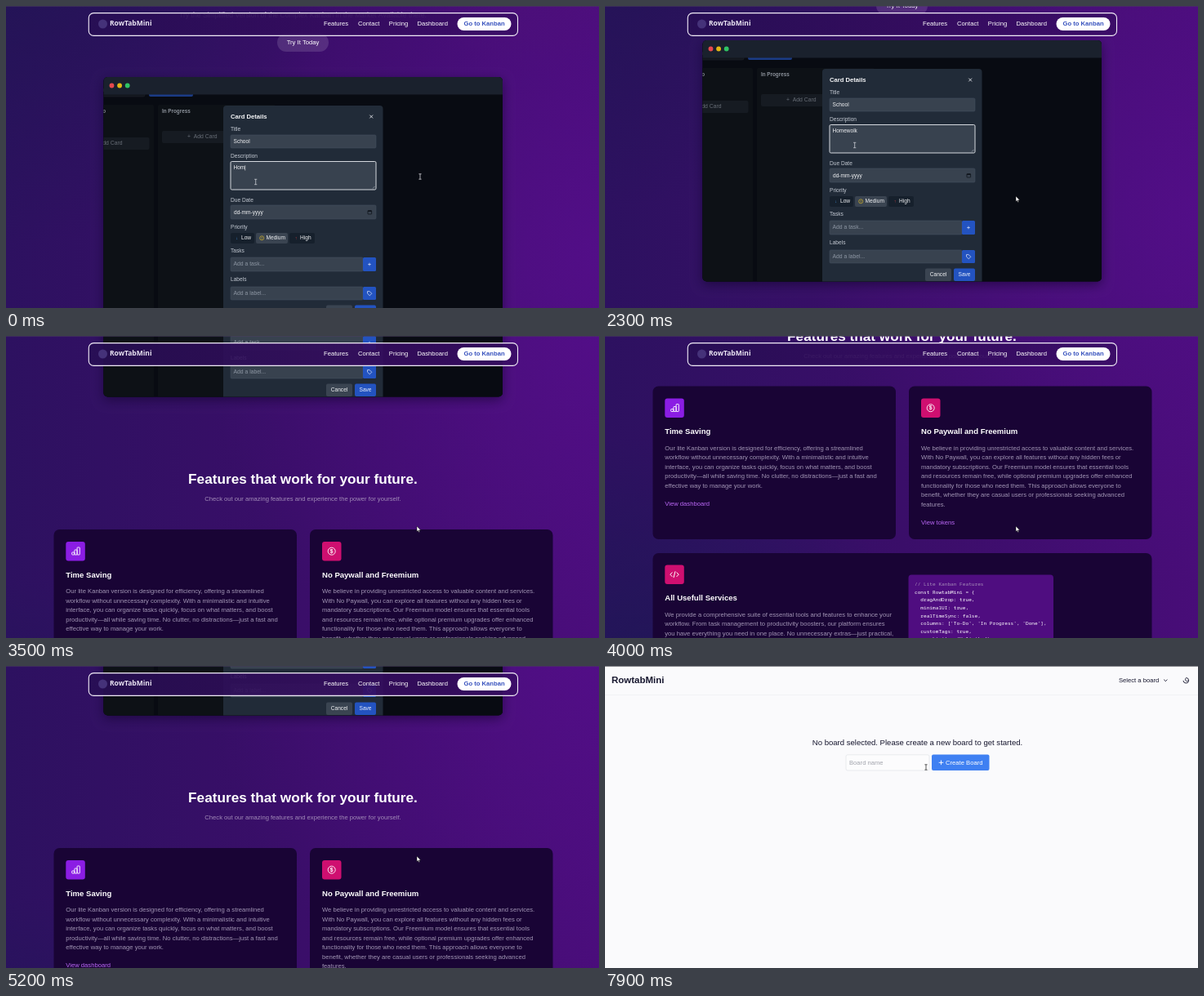
An HTML page with a canvas that plays this animation: 726 px wide and 370 px high, repeating every 8 s.

```html
<!DOCTYPE html>
<html lang="en">
<head>
<meta charset="utf-8">
<title>Board landing page</title>
<style>
html, body { margin: 0; width: 100%; height: 100%; overflow: hidden; background: #2a1460; }
canvas { display: block; width: 726px; height: 370px; }
</style>
</head>
<body>
<canvas id="stage"></canvas>
<script>
const W = 726, H = 370, LOOP = 8000, STEP = 100;
const REM = 7.65, SMALL = 6.69, MID = 363.5;
const SANS = '"Liberation Sans", Arial, sans-serif';
const MONO = '"Noto Sans Mono", monospace';
const canvas = document.getElementById('stage');
const c = canvas.getContext('2d');
const dpr = window.devicePixelRatio || 1;
canvas.width = W * dpr;
canvas.height = H * dpr;

// Keys are [time, value, ...]; values are interpolated linearly.
function track(keys, t) {
  if (t <= keys[0][0]) return keys[0].slice(1);
  for (let i = 1; i < keys.length; i++) {
    const [a, ...from] = keys[i - 1], [b, ...to] = keys[i];
    if (t <= b) return from.map((v, k) => v + (to[k] - v) * (t - a) / (b - a));
  }
  return keys[keys.length - 1].slice(1);
}

const SCROLL = [[0, 196], [400, 218], [900, 232], [1600, 241], [2400, 241],
  [3500, 504], [4500, 855], [4600, 855], [5200, 518], [6000, 0]];
const POINTER = [[1700, 507, 209], [2300, 503, 233], [6100, 503, 233], [6300, 508, 148],
  [6900, 596, 21], [7700, 596, 21], [7800, 480, 78], [7900, 393, 124]];
const ZOOM = [[5900, 1], [6300, 0.898], [7000, 0.86]];

function box(x, y, x2, y2, fill, r = 0, stroke, lw = 1) {
  c.beginPath();
  c.roundRect(x, y, x2 - x, y2 - y, r);
  if (fill) { c.fillStyle = fill; c.fill(); }
  if (stroke) { c.strokeStyle = stroke; c.lineWidth = lw; c.stroke(); }
}

function text(s, x, y, size, color, { weight = 400, align = 'left', family = SANS, spacing = 0 } = {}) {
  c.font = `${weight} ${size}px ${family}`;
  c.letterSpacing = spacing + 'px';
  c.textAlign = align;
  c.textBaseline = 'middle';
  c.fillStyle = color;
  c.fillText(s, x, y);
}

const BOLD = { weight: 700 };
const CENTER = { align: 'center' };
const BOLD_CENTER = { weight: 700, align: 'center' };

function lines(list, x, y, gap, size, color, opts) {
  list.forEach((s, i) => text(s, x, y + i * gap, size, color, opts));
}

function path(points, color, lw = 1, close = false) {
  c.beginPath();
  points.forEach(([x, y]) => c.lineTo(x, y));
  if (close) c.closePath();
  c.strokeStyle = color;
  c.lineWidth = lw;
  c.stroke();
}

function disc(x, y, r, fill) {
  c.beginPath();
  c.arc(x, y, r, 0, 7);
  c.fillStyle = fill;
  c.fill();
}

function ring(x, y, r, color, lw = 0.8) {
  c.beginPath();
  c.arc(x, y, r, 0, 7);
  c.strokeStyle = color;
  c.lineWidth = lw;
  c.stroke();
}

function plus(x, y, r, color, lw = 0.8) {
  path([[x - r, y], [x + r, y]], color, lw);
  path([[x, y - r], [x, y + r]], color, lw);
}

function glow(x, y, r, rgb, alpha) {
  const g = c.createRadialGradient(x, y, 0, x, y, r);
  g.addColorStop(0, `rgba(${rgb},${alpha})`);
  g.addColorStop(1, `rgba(${rgb},0)`);
  c.fillStyle = g;
  c.fillRect(0, 0, W, H);
}

function backdrop(s) {
  const g = c.createLinearGradient(0, 0, W, 0);
  g.addColorStop(0, '#2d1160');
  g.addColorStop(0.5, '#3a0e69');
  g.addColorStop(1, '#480d78');
  c.fillStyle = g;
  c.fillRect(0, 0, W, H);
  glow(W, 500 - s, 480, '92,15,150', 0.5);
  glow(0, 60 - s, 430, '28,22,78', 0.75);
  glow(640, 90 - s, 190, '88,20,120', 0.4);
  glow(60, 1130 - s, 330, '28,24,84', 0.85);
  glow(120, 1225 - s, 130, '68,18,116', 0.5);
}

function hero() {
  box(284, 95.5, 444, 112.5, 'rgba(255,255,255,.11)', 8.5);
  text('Lite Version of The Rapid Sorter.', 295, 104, SMALL, '#fff');
  text('Learn more', 398, 104, SMALL, '#fff');
  path([[398, 107.5], [432.5, 107.5]], '#fff', 0.5);
  const tight = { weight: 700, align: 'center', spacing: -0.72 };
  text('Modern analytics', MID, 150, 28.7, '#fff', tight);
  text('for the modern world', MID, 178.7, 28.7, '#9f98b4', tight);
  text('Try the Simplified Version of the Complex Kanban in the Market Available there.',
    MID, 207.5, 8.6, '#a79bbb', CENTER);
  box(332, 229.5, 395, 252, 'rgba(255,255,255,.13)', 11.2);
  text('Try It Today', MID, 241, REM, '#fff', CENTER);
}

function beam(x, y, color) {
  path([[x, y - 3.2], [x, y + 3.2]], color, 0.8);
  for (const dy of [-3.2, 3.2]) path([[x - 1.6, y + dy], [x + 1.6, y + dy]], color, 0.8);
}

function field(y, y2, right = 453, stroke) {
  box(275, y, right, y2, '#38424f', 1.5, stroke || '#465160', stroke ? 1 : 0.5);
}

function board(t) {
  box(0, 0, W, 330, '#080b12');
  box(60, 34, 181, 330, '#0d1116', 2);
  box(186, 34, 330, 330, '#0d1116', 2);
  box(60, 7, 170, 24, '#12161d', 2, '#20262f', 0.5);
  text('New column...', 150, 16, 6.4, '#4d535d', { align: 'right' });
  box(175, 7, 229, 24, '#1a3b85', 2);
  text('+  Add Column', 202, 16, 6.8, '#8b9cc4', CENTER);
  text('To Do', 122, 42.5, 6.3, '#858b95', { weight: 700, align: 'right' });
  text('In Progress', 191, 42, 6.3, '#8d939c', BOLD);
  if (t > 5800) text('New Card', 137, 60, 6.4, '#8a9099', { align: 'right' });
  else {
    box(60, 74, 175.5, 89, '#161b22', 2);
    text('+  Add Card', 142.5, 81.5, 6.8, '#676d76', { align: 'right' });
  }
  box(191, 66, 320, 81, '#161b22', 2);
  text('+  Add Card', 258.5, 73.5, 6.8, '#676d76', { align: 'right' });
}

function cardForm(t) {
  const label = '#c3c9d2', muted = '#8c95a2', blue = '#2353c0';
  box(266, 35, 461.5, 340, '#212b38', 4);
  text('Card Details', 275, 48.5, 7.65, '#f4f5f7', BOLD);
  path([[445.3, 46.6], [449.1, 50.4]], '#e5e7eb', 0.9);
  path([[449.1, 46.6], [445.3, 50.4]], '#e5e7eb', 0.9);
  text('Title', 275, 64.5, 6.6, label);
  field(71, 87);
  text('School', 278.5, 79, 6.6, '#f0f1f3');

  text('Description', 275, 97, 6.6, label);
  field(103.5, 138, 453, '#d5d9de');
  const typed = 'Homewolk'.slice(0, 3 + Math.floor(t / 460));
  text(typed, 278.5, 111.5, 6.5, '#f0f1f3');
  if (t < 2300) {
    const x = 279 + c.measureText(typed).width;
    path([[x, 108.3], [x, 114.5]], '#fff', 0.6);
  }
  path([[449, 136.5], [451.5, 134]], '#d5d9de', 0.5);
  beam(305.7, 128.5, '#c8ccd2');

  text('Due Date', 275, 151, 6.6, label);
  field(157, 174);
  text('dd-mm-yyyy', 279, 165.7, 6.6, '#f0f1f3');
  box(443, 163.5, 447.6, 168, null, 0.5, '#10151c', 0.8);
  path([[443, 164.5], [447.6, 164.5]], '#10151c', 1.2);

  text('Priority', 275, 184.5, 6.6, label);
  box(275, 191, 304, 204, '#16202c', 2);
  box(306, 191, 345, 204, '#3a4451', 2);
  box(347, 191, 378, 204, '#16202c', 2);
  text('↓', 282.5, 197, 5.5, '#3b82c6', CENTER);
  text('↑', 355, 197, 5.5, '#c43c45', CENTER);
  ring(313.2, 197.3, 2.5, '#d4b52a', 0.7);
  path([[313.2, 196], [313.2, 198.5]], '#d4b52a', 0.6);
  text('Low', 288, 197.2, 6.6, '#f0f1f3');
  text('Medium', 318.5, 197.2, 6.6, '#f0f1f3');
  text('High', 360, 197.2, 6.6, '#f0f1f3');

  text('Tasks', 275, 213.5, 6.6, label);
  field(221, 238, 437);
  box(437, 221, 453, 238, blue, 1.5);
  text('Add a task...', 278.5, 229.5, 6.8, muted);
  plus(445, 229.5, 1.8, '#d9e2f7', 0.7);
  text('Labels', 275, 248, 6.6, label);
  field(257, 273, 437);
  box(437, 257, 453, 273, blue, 1.5);
  text('Add a label...', 278.5, 265.2, 6.8, muted);
  path([[442.5, 262.6], [445.2, 262.6], [447.8, 265.3], [445.3, 267.8], [442.5, 265.2]], '#e3eafa', 0.7, true);

  box(392, 279.5, 424, 295, '#3a4451', 2);
  text('Cancel', 408, 287.2, 6.6, '#f0f1f3', CENTER);
  box(427, 279.5, 453, 295, blue, 2);
  text('Save', 440, 287.2, 6.6, '#e9effc', CENTER);
}

function demoWindow(t) {
  c.save();
  c.translate(0, 283);
  c.shadowColor = 'rgba(15,2,40,.55)';
  c.shadowBlur = 14 * dpr;
  c.shadowOffsetY = 4 * dpr;
  box(119.5, 0, 608, 295.5, '#080b12', 5);
  c.shadowColor = 'transparent';
  c.beginPath();
  c.roundRect(119.5, 0, 488.5, 295.5, 5);
  c.clip();
  c.save();
  const [z] = track(ZOOM, t);
  c.translate(MID, 158);
  c.scale(z, z);
  c.translate(-MID, -158);
  board(t);
  cardForm(t);
  c.restore();
  box(119.5, 0, 608, 21.5, '#1a212d');
  ['#e5484d', '#e2b714', '#2fc463'].forEach((col, i) => disc(129.5 + i * 9.6, 10.5, 2.9, col));
  c.restore();
}

function panel(x, y, x2, y2) {
  box(x, y, x2, y2, '#190435', 7);
}

function article(x, y, iconColor, heading, body, link) {
  const grey = '#a195b4';
  box(x, y, x + 23.5, y + 23.5, iconColor, 3);
  text(heading, x, y + 41, 9.56, '#fff', BOLD);
  lines(body, x, y + 61.3, 11.47, REM, grey);
  text(link, x, y + 61.3 + (body.length + 1) * 11.47 - 1, REM, '#bb68f7');
}

function features() {
  text('Features that work for your future.', MID, 680.5, 17.2, '#fff', BOLD_CENTER);
  text('Check out our amazing features and experience the power for yourself.',
    MID, 704, REM, '#a28bb8', CENTER);

  panel(58.5, 741, 356, 928.5);
  article(73.3, 756, '#8b1de4', 'Time Saving', [
    'Our lite Kanban version is designed for efficiency, offering a streamlined',
    'workflow without unnecessary complexity. With a minimalistic and intuitive',
    'interface, you can organize tasks quickly, focus on what matters, and boost',
    'productivity—all while saving time. No clutter, no distractions—just a fast and',
    'effective way to manage your work.'
  ], 'View dashboard');
  [3, 6, 9].forEach((h, i) =>
    box(80.7 + i * 3.2, 772 - h, 83.9 + i * 3.2, 772, null, 0.6, '#fff', 0.9));

  panel(372, 741, 669.5, 928.5);
  article(387, 756, '#cf0f70', 'No Paywall and Freemium', [
    'We believe in providing unrestricted access to valuable content and services.',
    'With No Paywall, you can explore all features without any hidden fees or',
    'mandatory subscriptions. Our Freemium model ensures that essential tools',
    'and resources remain free, while optional premium upgrades offer enhanced',
    'functionality for those who need them. This approach allows everyone to',
    'benefit, whether they are casual users or professionals seeking advanced',
    'features.'
  ], 'View tokens');
  ring(398.7, 767.7, 4.5, '#fff', 0.9);
  text('$', 398.7, 767.9, 6.8, '#fff', BOLD_CENTER);

  panel(58.5, 945.5, 669.5, 1099);
  article(73.3, 960, '#cf0f70', 'All Usefull Services', [
    'We provide a comprehensive suite of essential tools and features to enhance your',
    'workflow. From task management to productivity boosters, our platform ensures',
    'you have everything you need in one place. No unnecessary extras—just practical,',
    'efficient, and user-friendly services designed to make your life easier.'
  ], 'View code collaboration');
  path([[82.4, 969], [79.8, 971.7], [82.4, 974.4]], '#fff');
  path([[87.6, 969], [90.2, 971.7], [87.6, 974.4]], '#fff');
  path([[86, 967.8], [84, 975.6]], '#fff');

  box(371.5, 972, 549, 1072.5, '#4f0d80', 4);
  const mono = { family: MONO };
  text('// Lite Kanban Features', 379, 984, 6.13, '#a58bb8', mono);
  lines([
    'const RowtabMini = {',
    '  dragAndDrop: true,',
    '  minimalUI: true,',
    '  realTimeSync: false,',
    "  columns: ['To-Do', 'In Progress', 'Done'],",
    '  customTags: true,',
    "  userLimits: 'Unlimited',",
    '};'
  ], 379, 993.6, 9.56, 6.13, '#fff', mono);
}

function contact(t) {
  c.globalAlpha = Math.min(1, Math.max(0, (t - 4500) / 650));
  text('Any question or remarks? Just write us a message!', MID, 1224, 17.2, '#fff', BOLD_CENTER);
  c.globalAlpha = 1;
}

function navbar() {
  const g = c.createLinearGradient(101, 0, 627, 0);
  g.addColorStop(0, 'rgba(39,14,84,.9)');
  g.addColorStop(0.5, 'rgba(50,12,92,.9)');
  g.addColorStop(1, 'rgba(58,12,102,.9)');
  box(101.3, 8.6, 626.5, 36.4, g, 6, '#f1ecf7', 1.1);
  disc(118.5, 22, 5.5, '#453279');
  text('RowTabMini', 127, 22, 8.5, '#e9e4f2', { weight: 700, family: '"Open Sans", sans-serif' });
  [['Features', 389], ['Contact', 431], ['Pricing', 468.8], ['Dashboard', 503.5]]
    .forEach(([s, x]) => text(s, x, 22.2, REM, '#fff'));
  box(552.5, 14, 618.5, 30, '#fff', 8);
  text('Go to Kanban', 585.5, 22.2, REM, '#3550bd', BOLD_CENTER);
}

function landing(t) {
  const [s] = track(SCROLL, t);
  backdrop(s);
  c.save();
  c.translate(0, -s);
  hero();
  demoWindow(t);
  features();
  contact(t);
  c.restore();
  navbar();
  box(0, 0, W, 0.8, 'rgba(70,62,90,.8)');
}

function boardPage(t) {
  const ink = '#17172f';
  box(0, 0, W, H, '#fafafc');
  box(0, 0, W, 0.9, '#8d8d93');
  path([[0, 35.5], [W, 35.5]], '#f1f2f5');
  text('RowtabMini', 8, 17.5, 11.47, ink, BOLD);
  text('Select a board', 629, 17.6, REM, ink);
  path([[684.2, 16.6], [686.3, 18.7], [688.4, 16.6]], ink, 0.9);
  c.beginPath();
  c.arc(711.3, 17.7, 3.3, -1.5, 3.1, false);
  c.stroke();
  c.beginPath();
  c.moveTo(711.5, 14.4);
  c.bezierCurveTo(708.8, 17.2, 711.8, 20.2, 714.6, 17.5);
  c.stroke();
  if (t < 7200) return;
  text('No board selected. Please create a new board to get started.', 382.5, 94.5, 9.56, ink, CENTER);
  box(295, 108.8, 397, 128, '#fcfcfd', 2, '#e4e6ea', 0.8);
  text('Board name', 299, 118.6, REM, '#a3a5ad');
  box(400, 108.6, 470.5, 128, '#3f80f2', 2);
  plus(411.5, 118.3, 2.8, '#fff', 0.9);
  text('Create Board', 417, 118.6, REM, '#fff');
}

function pointer(t) {
  const [x, y] = track(POINTER, t);
  if (t <= 1700) return beam(x, y, '#d4d4da');
  if (t >= 7900) return beam(x, y, '#333');
  c.beginPath();
  [[0, 0], [0, 6.6], [1.5, 5.3], [2.5, 7.5], [3.5, 7], [2.6, 4.9], [4.6, 4.7]]
    .forEach(([dx, dy]) => c.lineTo(x + dx, y + dy));
  c.closePath();
  c.fillStyle = '#fff';
  c.fill();
  c.strokeStyle = '#151515';
  c.lineWidth = 0.5;
  c.stroke();
}

function draw(now) {
  const t = Math.floor((now % LOOP) / STEP) * STEP;
  c.setTransform(dpr, 0, 0, dpr, 0, 0);
  if (t < 7100) landing(t);
  else boardPage(t);
  pointer(t);
}

let start;
function tick(now) {
  start ??= now;
  draw(now - start);
  requestAnimationFrame(tick);
}
draw(0);
requestAnimationFrame(tick);
</script>
</body>
</html>
```
